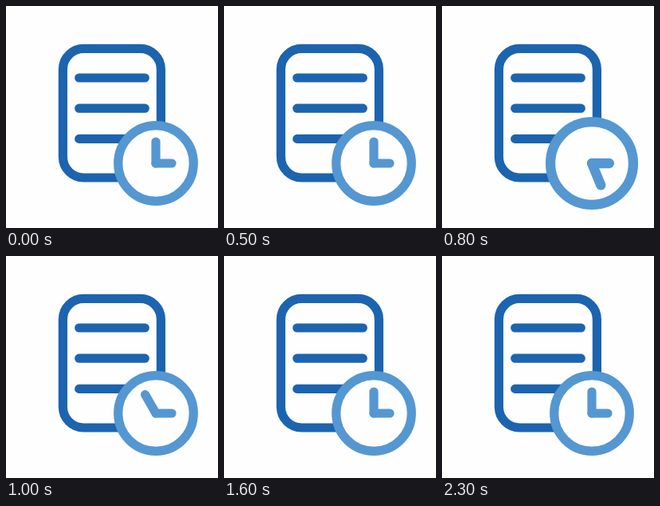
Write an HTML page that moves like this. It is 266 px wide and 278 px high and loops after 2.4 s.

```html
<!DOCTYPE html>
<html lang="en">
<head>
<meta charset="utf-8">
<title>Document with clock</title>
<style>
  html, body { margin: 0; width: 100%; height: 100%; overflow: hidden; background: #fefefe; }
  svg { display: block; width: 266px; height: 278px; }
  .line { fill: none; stroke-width: 11.2; stroke-linecap: round; stroke-linejoin: round; }
</style>
</head>
<body>
<svg viewBox="0 0 266 278">
  <g class="line" stroke="#1c64af">
    <rect x="71.4" y="53.4" width="123" height="161.6" rx="26"/>
    <path d="M91.7 90H174.3M91.7 128.2H174.3M91.7 166.4H174.3"/>
  </g>
  <g id="clock" class="line" stroke="#5597d1">
    <circle r="47.3" fill="#fefefe"/>
    <path d="M0 0H20"/>
    <path id="minute" d="M0 0V-27"/>
  </g>
</svg>
<script>
  const LOOP = 2400, STEP = 100;
  const BEGIN = 540, TURN = 565, PULSE = 460;
  const clock = document.getElementById("clock");
  const minute = document.getElementById("minute");
  const start = performance.now();

  const progress = (t, length) => Math.min(1, Math.max(0, (t - BEGIN) / length));
  const ease = p => (1 - Math.cos(Math.PI * p)) / 2;

  function draw(now) {
    const elapsed = Math.max(0, now - start) % LOOP;
    const t = Math.floor(elapsed / STEP) * STEP;
    const angle = 360 * ease(progress(t, TURN));
    const scale = 1 + 0.1 * Math.sin(Math.PI * progress(t, PULSE));
    clock.setAttribute("transform", `translate(188 197) scale(${scale})`);
    minute.setAttribute("transform", `rotate(${angle})`);
    requestAnimationFrame(draw);
  }
  draw(start);
</script>
</body>
</html>
```
